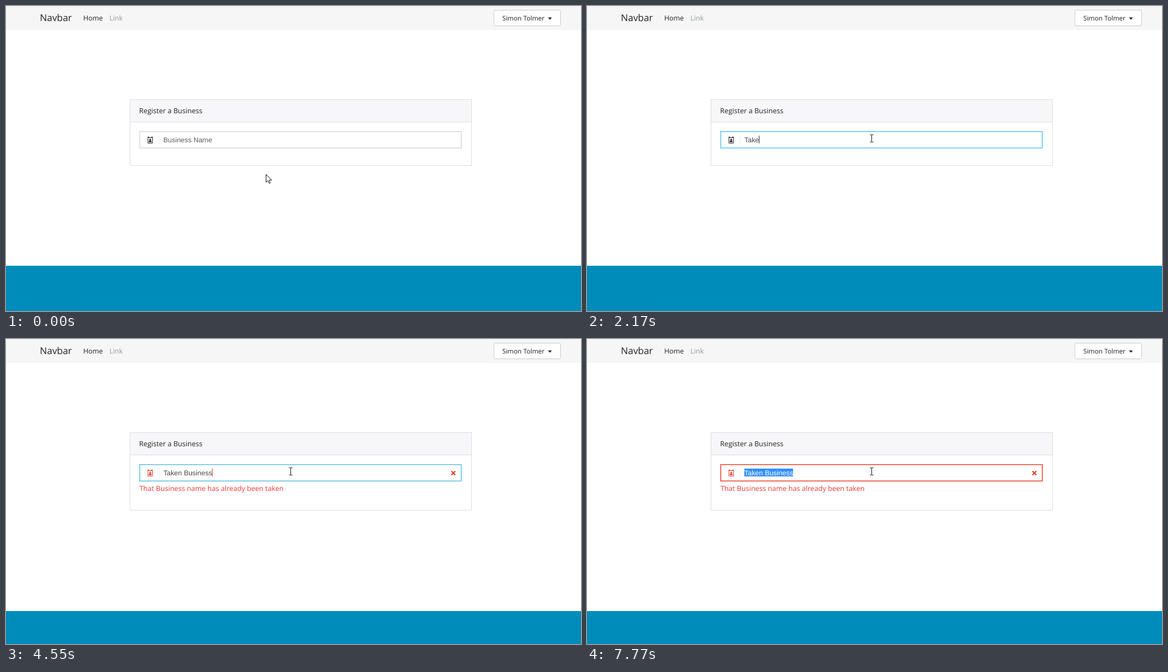
These frames come from a looping animation (1027 px wide and 546 px high, 8 s). An HTML page:

```html
<!DOCTYPE html>
<html lang="en">
<head>
<meta charset="utf-8">
<title>Register a Business</title>
<style>
  html, body { margin: 0; width: 100%; height: 100%; overflow: hidden; background: #fff; }
  svg { display: block; width: 100%; height: 100%; }
  text { font: 12.6px "Open Sans", sans-serif; fill: #222; text-rendering: geometricPrecision; white-space: pre; }
  .nav { font-size: 12.4px; }
  .brand { font-size: 16.9px; }
  .user { font-size: 11.7px; }
  .input { font: 12.44px "Liberation Sans", Arial, sans-serif; fill: #555; }
  .error { fill: #e53c37; }
  .line { fill: none; stroke: #ddd; }
</style>
</head>
<body>
<svg viewBox="0 0 1027 546">
  <rect width="1027" height="43" fill="#f6f6f6"/>
  <text class="brand" x="60.5" y="27">Navbar</text>
  <text class="nav" x="137.9" y="26">Home</text>
  <text class="nav" x="184.8" y="26" style="fill:#8f989d">Link</text>
  <rect x="871.5" y="7.5" width="119" height="28" rx="2" fill="#fff" stroke="#ccc"/>
  <text class="user" x="886.5" y="26">Simon Tolmer</text>
  <path d="M968 20.5h7l-3.5 4z" fill="#222"/>

  <rect x="222" y="168" width="609" height="39" fill="#f7f7f9"/>
  <path class="line" d="M222 207.5h609"/>
  <rect id="panel" class="line" x="221.5" y="167.5" width="610" height="118"/>
  <text x="237.8" y="192">Register a Business</text>

  <g id="border" fill="none">
    <rect x="238.5" y="224.5" width="575" height="30"/>
    <rect x="239.5" y="225.5" width="573" height="28" opacity=".6"/>
  </g>
  <g id="badge">
    <path d="M253.5 235.5h8v10h-8z" fill="none" stroke="currentColor"/>
    <path d="M253 234h2.5v2h-2.5zM259.500 234h2.5v2h-2.500zM255 243.800c0-3 1.200-3.300 2.500-3.300s2.500.3 2.500 3.300z" fill="currentColor"/>
    <circle cx="257.5" cy="239" r="1.6" fill="currentColor"/>
  </g>
  <path d="M273.5 231v17" stroke="#eee"/>
  <rect id="selection" x="281" y="232" height="14" fill="#3390ff"/>
  <text id="value" class="input" x="281" y="244"></text>
  <rect id="caret" y="232" width="1" height="14"/>

  <g id="spinner" fill="#222"></g>
  <g id="failure">
    <path d="M795.5 236.500l7 7m0-7l-7 7" stroke="#e53c2c" stroke-width="2.2"/>
    <text class="error" x="238.400" y="272">That Business name has already been taken</text>
  </g>
  <rect id="footer" y="465" width="1027" height="82" fill="#008cba"/>

  <path id="arrow" d="M0 0V14L3.300 11L5.500 16L7.600 15.100L5.500 10.200H10Z" fill="#fff" stroke="#111"/>
  <path id="beam" d="M-3 -6.500h2.500l.5 .5l.5 -.5h2.500M0 -6v12M-3 6.500h2.500l.5 -.5l.5 .5h2.500" fill="none" stroke="#111"/>
</svg>
<script>
const $ = id => document.getElementById(id);
const LOOP = 8000, NAME = "Taken Business", FIELD_X = 281;
const GREY = [218, 218, 218], BLUE = [91, 205, 246], RED = [236, 76, 56];

// [time, value] lists: each value holds until the next time.
const typed = [[1820, 1], [1960, 2], [2100, 3], [2170, 4], [2310, 5], [2450, 6], [2660, 7],
  [2800, 8], [2940, 9], [3010, 11], [3080, 12], [3290, 13], [3360, 14]];
const focus = [[1050, .5], [1120, 1]];
const invalid = [[4550, .08], [4620, .55], [4690, 1]];
const spin = [[3990, 0], [4130, 45], [4270, 90], [4340, 135], [4480, 180]];
const caretOn = [[1050, 1470], [1820, 3850], [4550, 5040], [5460, 5950], [6440, 6930], [7420, 7770]];

const held = (steps, t) => steps.reduce((v, [at, next]) => t >= at ? next : v, 0);
const mix = (a, b, k) => a.map((v, i) => v + (b[i] - v) * k);
const rgb = c => `rgb(${c.map(Math.round)})`;
const show = (id, on) => $(id).setAttribute("display", on ? "inline" : "none");
const set = (id, name, value) => $(id).setAttribute(name, value);

// Eight dots; the last three clockwise grow larger.
$("spinner").innerHTML = Array.from({ length: 8 }, (_, i) => {
  const a = i * Math.PI / 4, r = 1.05 + Math.max(0, i - 4) * .27;
  return `<circle cx="${5.8 * Math.cos(a)}" cy="${5.8 * Math.sin(a)}" r="${r}"/>`;
}).join("");

function drawPointer(t) {
  const step = Math.min(9, Math.max(0, Math.floor((t - 140) / 70) + 1));
  const p = step / 9, k = p * p * (3 - 2 * p);
  const x = 464.5 + 44 * k, y = 301.5 - 64.500 * k;
  const overField = y < 255;
  show("arrow", !overField);
  show("beam", overField);
  set(overField ? "beam" : "arrow", "transform", `translate(${x} ${y})`);
}

function drawField(t) {
  const count = held(typed, t), selected = t >= 7770, failed = t >= 4550;
  const value = $("value");
  value.textContent = count ? NAME.slice(0, count) : "Business Name";
  value.style.fill = selected ? "#fff" : count ? "#484848" : "#606060";
  const width = Math.round(value.getComputedTextLength());

  show("selection", selected);
  set("selection", "width", width);
  show("caret", caretOn.some(([from, to]) => t >= from && t < to));
  set("caret", "x", FIELD_X + (count ? width : 0));
  set("caret", "y", count ? 232 : 233);
  set("caret", "fill", failed && t < 4620 ? "#e53c2c" : "#333");

  set("border", "stroke", rgb(mix(mix(GREY, BLUE, held(focus, t)), RED, held(invalid, t))));
  set("badge", "color", failed ? "#e53c2c" : "#222");
  show("spinner", t >= 3990 && !failed);
  set("spinner", "transform", `translate(798.5 239.5) rotate(${held(spin, t)})`);
  show("failure", failed);
  set("panel", "height", failed ? 139 : 118);
  set("footer", "y", failed ? 487 : 465);
}

function draw() {
  const t = performance.now() % LOOP;
  drawPointer(t);
  drawField(t);
  requestAnimationFrame(draw);
}
draw();
</script>
</body>
</html>
```
